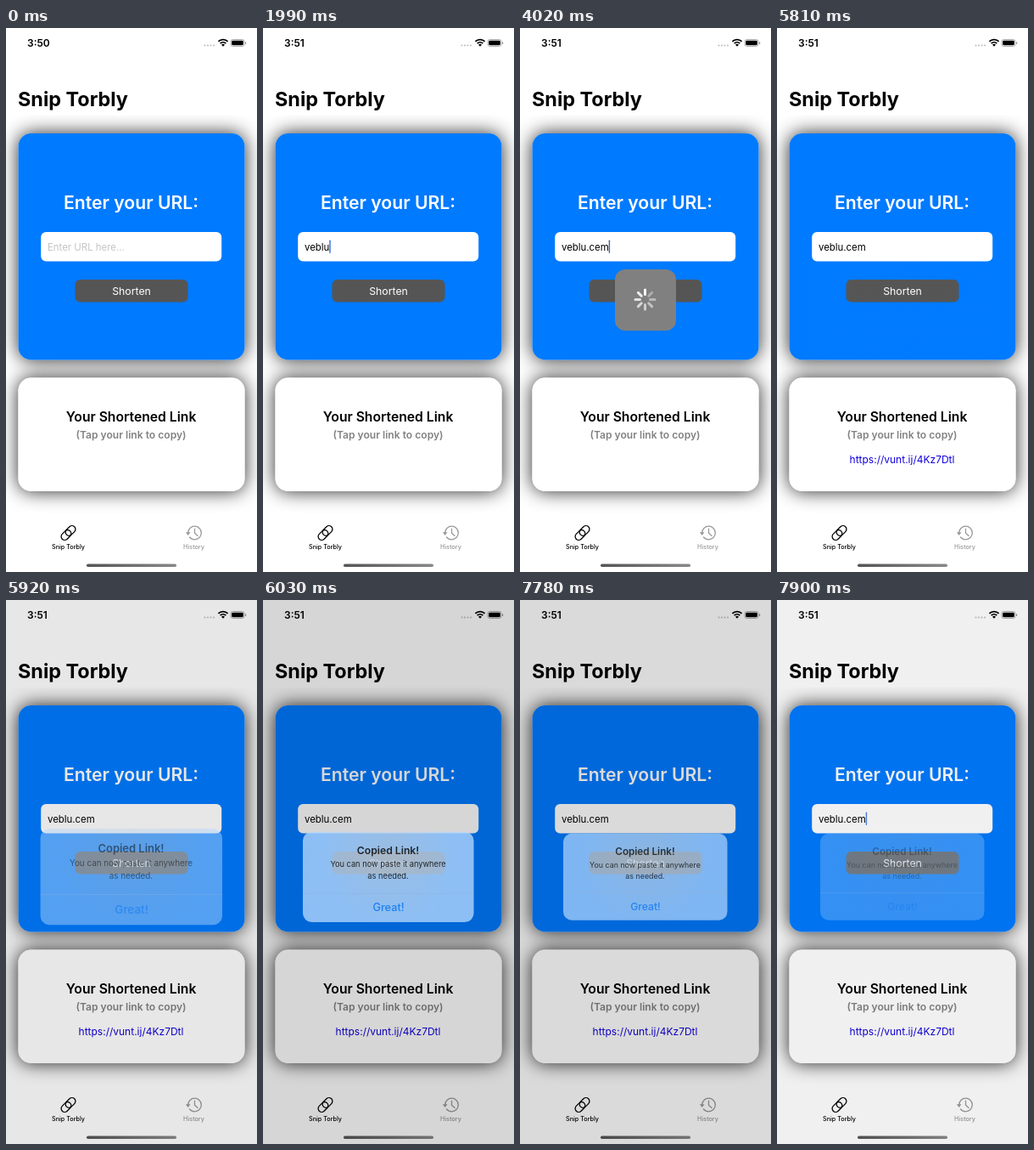
An HTML page with a canvas that plays this animation: 296x640 px, repeating every 8000 ms.

```html
<!DOCTYPE html>
<html lang="en">
<head>
<meta charset="utf-8">
<title>Link shortener</title>
<style>
  html, body { margin: 0; width: 100%; height: 100%; overflow: hidden; background: #fff; }
  canvas { display: block; width: 296px; height: 640px; }
</style>
</head>
<body>
<canvas id="stage"></canvas>
<script>
const W = 296, H = 640, LOOP = 8000;
const APP = 'Snip Torbly', ADDRESS = 'veblu.cem', SHORT = 'https://vunt.ij/4Kz7Dtl';
const canvas = document.getElementById('stage');
const c = canvas.getContext('2d');
const dpr = window.devicePixelRatio || 1;
canvas.width = W * dpr;
canvas.height = H * dpr;

const clamp = (v, max = 1) => Math.min(max, Math.max(0, v));
const ramp = (t, start, ms) => clamp((t - start) / ms);
const easeOut = x => 1 - (1 - x) ** 2;

// Letters entered so far in a burst with a steady rhythm.
const burst = (t, start, gap, count) => clamp(1 + Math.floor((t - start) / gap), count);
const lettersAt = t => burst(t, 1250, 155, 5) + burst(t, 2490, 136, 4);

const progressAt = t => ramp(t, 3710, 310) - ramp(t, 4380, 170);
const alertAt = t => easeOut(ramp(t, 5810, 400)) - easeOut(ramp(t, 7720, 400));

// Solid while typing, then blinking; hidden while the alert has focus.
function caretAt(t) {
  if (t > 5700 && t < 7840) return 0;
  if (t < 3410) return ramp(t, 520, 120);
  const phase = (t - 3410) % 1025;
  return clamp((Math.abs(phase - 205) - 85) / 120);
}

function box(x, y, w, h, r, fill) {
  c.beginPath();
  c.roundRect(x, y, w, h, r);
  c.fillStyle = fill;
  c.fill();
}

function text(str, x, y, size, weight, color, align = 'center') {
  c.font = `${weight} ${size}px Inter, "Liberation Sans", sans-serif`;
  c.textAlign = align;
  c.fillStyle = color;
  c.fillText(str, x, y);
}

function line(color, width, ...points) {
  c.beginPath();
  points.forEach(([x, y]) => c.lineTo(x, y));
  c.strokeStyle = color;
  c.lineWidth = width;
  c.stroke();
}

function statusBar(t) {
  text(t < 180 ? '3:50' : '3:51', 25, 22, 12, 600, '#000', 'left');
  for (let i = 0; i < 4; i++) box(233.5 + i * 3.5, 19.5, 2, 2, 1, '#bbb');
  c.strokeStyle = '#000';
  c.lineCap = 'butt';
  for (const r of [4.7, 7.9]) {
    c.beginPath();
    c.arc(256, 21.5, r, -Math.PI * .75, -Math.PI * .25);
    c.lineWidth = 1.8;
    c.stroke();
  }
  c.beginPath();
  c.moveTo(256, 21.8);
  c.arc(256, 21.8, 2.8, -Math.PI * .75, -Math.PI * .25);
  c.fillStyle = '#000';
  c.fill();
  c.beginPath();
  c.roundRect(265, 13.5, 16, 8, 2.4);
  c.strokeStyle = '#999';
  c.lineWidth = .8;
  c.stroke();
  box(266.2, 14.7, 13.6, 5.6, 1.4, '#000');
  box(282, 16.2, 1.2, 2.8, .6, '#999');
}

function cards() {
  const pair = top => {
    box(14.5, 124, 267, 266.5, 15, top);
    box(14.5, 411.5, 267, 133.5, 15, '#fff');
  };
  c.save();
  c.beginPath();
  c.rect(0, 103, W, 468);
  c.clip();
  c.shadowColor = 'rgba(0,0,0,.85)';
  c.shadowBlur = 22 * dpr;
  pair('#fff');
  c.restore();
  pair('#007aff');
}

function linkIcon(x, y) {
  c.save();
  c.translate(x, y);
  c.rotate(-Math.PI / 4);
  c.strokeStyle = '#000';
  c.lineWidth = 1.3;
  for (const side of [-1, 1]) {
    c.beginPath();
    c.roundRect(side * 3.6 - 6.6, -4.1, 13.2, 8.2, 4.1);
    c.stroke();
  }
  c.restore();
}

function historyIcon(x, y) {
  c.beginPath();
  c.arc(x, y, 7.8, -Math.PI, Math.PI * .78);
  c.strokeStyle = '#999';
  c.lineWidth = 1.3;
  c.stroke();
  line('#999', 1.3, [x, y - 4.8], [x, y + .3], [x + 3.6, y + 3.4]);
  c.beginPath();
  c.moveTo(x - 10.6, y - .8);
  c.lineTo(x - 5, y - .8);
  c.lineTo(x - 7.8, y + 3);
  c.fillStyle = '#999';
  c.fill();
}

function tabBar() {
  c.lineCap = 'round';
  linkIcon(73.5, 594);
  historyIcon(222.5, 594);
  text(APP, 73.5, 613, 7.2, 500, '#000');
  text('History', 221.5, 613, 7.2, 500, '#999');
  const shade = c.createLinearGradient(95, 0, 201, 0);
  shade.addColorStop(0, '#555');
  shade.addColorStop(1, '#888');
  box(95, 630.5, 106, 3.4, 1.7, shade);
}

function form(t) {
  text('Enter your URL:', 147.5, 213, 21.2, 600, '#fff');
  box(41.2, 240, 213, 34.5, 6, '#fff');
  const entry = ADDRESS.slice(0, lettersAt(t));
  if (entry) text(entry, 49, 261.5, 11.4, 400, '#000', 'left');
  else text('Enter URL here...', 49, 261.5, 11.4, 400, '#c4c4c6', 'left');

  c.globalAlpha = caretAt(t);
  const end = 49 + (entry ? c.measureText(entry).width : 0);
  box(end, 249.5, 1.4, 15.5, .7, progressAt(t) > 0 ? '#46658c' : '#2f6be0');
  c.globalAlpha = 1;

  box(81.5, 296, 133, 26.5, 6, '#555');
  text('Shorten', 148, 314, 12.3, 400, '#fff');
}

function result(t) {
  text('Your Shortened Link', 147.5, 463, 15.7, 600, '#000');
  text('(Tap your link to copy)', 147.5, 483, 12.1, 600, '#828282');
  if (t >= 4440) text(SHORT, 147.5, 511.5, 12, 400, '#1000dc');
}

function progress(alpha) {
  c.save();
  c.globalAlpha = alpha;
  box(112, 284, 72, 72, 12, '#808080');
  c.translate(147.5, 319.5);
  c.lineCap = 'round';
  for (let i = 0; i < 8; i++) {
    line(`rgba(255,255,255,${.95 - i * .085})`, 3, [0, -6], [0, -11.5]);
    c.rotate(-Math.PI / 4);
  }
  c.restore();
}

function alertPanel(t, shown) {
  const scale = t < 7000 ? 1 + .207 * (1 - shown) : 1;
  const frost = c.createRadialGradient(147.5, 302, 10, 147.5, 302, 80);
  frost.addColorStop(0, '#bfd3e8');
  frost.addColorStop(1, '#b0d5fd');
  c.save();
  c.translate(147.5, 325.5);
  c.scale(scale, scale);
  c.translate(-147.5, -325.5);
  c.globalAlpha = shown;
  box(51, 274.8, 193.5, 102, 10, frost);
  if (t >= 7640 && t < 7780) box(51, 344.5, 193.5, 32.3, [0, 0, 10, 10], '#9fc2ec');
  box(51, 344, 193.5, .7, 0, '#8fb2dc');
  text('Copied Link!', 147.5, 300, 11.7, 600, '#000');
  text('You can now paste it anywhere', 147.5, 314.5, 8.9, 400, '#000');
  text('as needed.', 147.5, 327.5, 8.9, 400, '#000');
  text('Great!', 148, 364.5, 12.2, 500, '#0070f0');
  c.restore();
}

function draw(t) {
  const shown = alertAt(t);
  c.setTransform(dpr, 0, 0, dpr, 0, 0);
  c.fillStyle = '#fff';
  c.fillRect(0, 0, W, H);
  statusBar(t);
  text(APP, 14, 91.5, 23.4, 700, '#000', 'left');
  cards();
  form(t);
  result(t);
  tabBar();
  progress(progressAt(t));
  c.fillStyle = `rgba(0,0,0,${.2 * shown})`;
  c.fillRect(0, 0, W, H);
  alertPanel(t, shown);
}

const start = performance.now();
function tick() {
  draw((performance.now() - start) % LOOP);
  requestAnimationFrame(tick);
}
tick();
</script>
</body>
</html>
```
